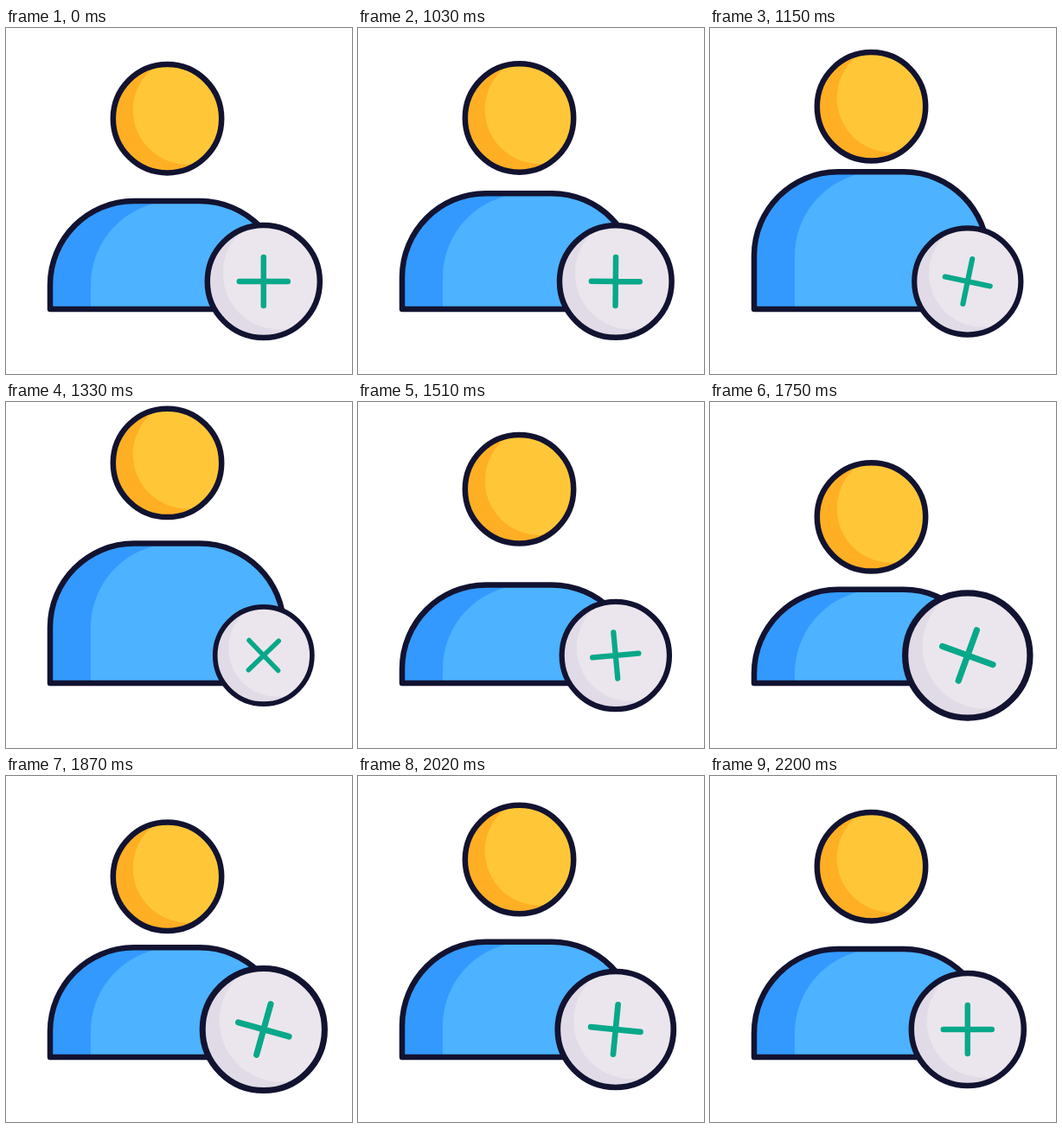
These frames come from a looping animation (400x400 px, 2.23 s). An HTML page:

```html
<!DOCTYPE html>
<html lang="en">
<head>
<meta charset="utf-8">
<title>Add user</title>
<style>
  html, body { margin: 0; width: 100%; height: 100%; overflow: hidden; background: #fff; }
  svg { display: block; width: 100%; height: 100%; }
  .line { fill: none; stroke: #121331; stroke-width: 6.5; stroke-linecap: round; stroke-linejoin: round; }
</style>
</head>
<body>
<svg viewBox="0 0 400 400">
  <defs>
    <clipPath id="headClip"><circle cx="186.5" cy="104.7" r="62.7"/></clipPath>
    <clipPath id="bodyClip"><path id="bodyMask"/></clipPath>
    <clipPath id="badgeClip"><circle r="65"/></clipPath>
  </defs>
  <g id="head">
    <circle cx="186.5" cy="104.7" r="62.7" fill="#ffaf24"/>
    <circle cx="209.5" cy="95" r="62.7" fill="#ffc738" clip-path="url(#headClip)"/>
    <circle class="line" cx="186.5" cy="104.7" r="62.7"/>
  </g>
  <path id="bodyFill" fill="#3399ff"/>
  <g clip-path="url(#bodyClip)"><path id="bodyLight" fill="#4db2ff"/></g>
  <path id="bodyLine" class="line"/>
  <g id="badge">
    <circle r="65" fill="#e0dbe6"/>
    <circle cx="18" cy="-9.5" r="65" fill="#ebe6ed" clip-path="url(#badgeClip)"/>
    <circle class="line" r="65"/>
    <path id="plus" d="M-28 0H28M0-28V28" fill="none" stroke="#08a88a" stroke-width="6.5" stroke-linecap="round"/>
  </g>
</svg>
<script>
  const LOOP = 2230, START = 1030, STEP = 30;
  const $ = id => document.getElementById(id);
  const smooth = x => x * x * (3 - 2 * x);
  const easeOut = x => 1 - (1 - x) * (1 - x);

  // Each key is [time, value, easing towards it].
  const headY = [[1000, 0], [1345, -34.5], [1690, 31], [2060, -9.5], [2195, 0]];
  const bodyY = [[1000, 0], [1270, -42, easeOut], [1612, 26], [1640, 26], [1970, -9.5], [2195, 0]];
  const scale = [[1000, 1], [1360, 0.86], [1715, 1.11], [1740, 1.11], [2170, 1]];
  const turn = [[1000, 0], [1740, 110], [2170, 90]];

  function valueAt(keys, t) {
    if (t <= keys[0][0]) return keys[0][1];
    for (let i = 1; i < keys.length; i++) {
      const [t0, v0] = keys[i - 1], [t1, v1, ease = smooth] = keys[i];
      if (t < t1) return v0 + (v1 - v0) * ease((t - t0) / (t1 - t0));
    }
    return keys[keys.length - 1][1];
  }

  // Shoulders with round upper corners and a fixed base.
  function shoulders(left, right, dy) {
    const r = 97, top = 200 + dy, side = Math.min(325, top + r), k = r * 0.448;
    return `M${left} 325V${side}C${left} ${top + k} ${left + k} ${top} ${left + r} ${top}` +
      `H${right - r}C${right - k} ${top} ${right} ${top + k} ${right} ${side}V325Z`;
  }

  function draw(time) {
    let t = time % LOOP;
    t = t < START ? 0 : START + Math.floor((t - START) / STEP) * STEP;
    const dy = valueAt(bodyY, t);
    const body = shoulders(51, 321, dy);
    $("head").setAttribute("transform", `translate(0 ${valueAt(headY, t)})`);
    for (const id of ["bodyMask", "bodyFill", "bodyLine"]) $(id).setAttribute("d", body);
    $("bodyLight").setAttribute("d", shoulders(98, 368, dy));
    $("badge").setAttribute("transform", `translate(297.8 293) scale(${valueAt(scale, t)})`);
    $("plus").setAttribute("transform", `rotate(${valueAt(turn, t)})`);
  }

  const begin = performance.now();
  function tick() {
    draw(performance.now() - begin);
    requestAnimationFrame(tick);
  }
  tick();
</script>
</body>
</html>
```
